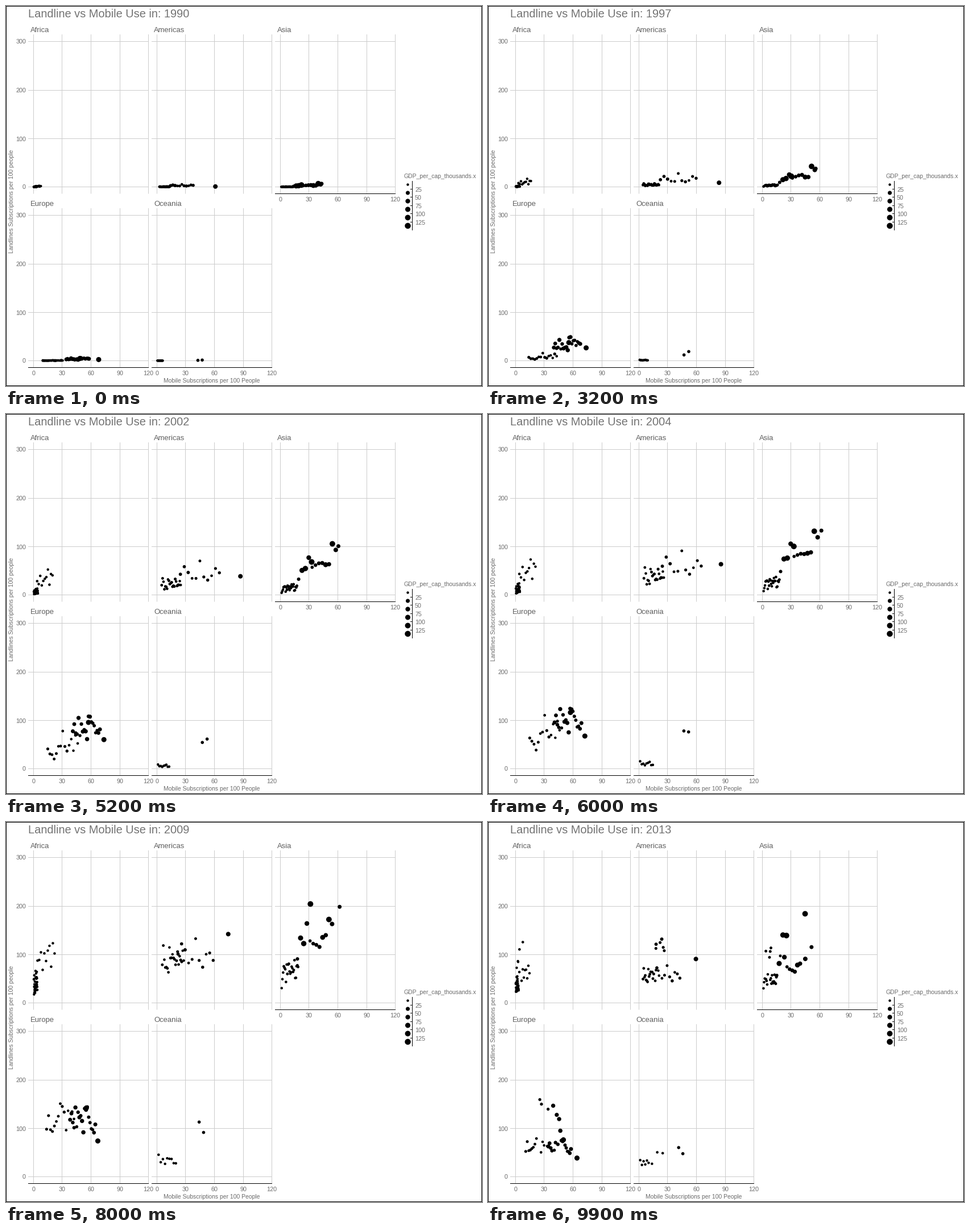
A matplotlib script that plays this animation: 837x669 px, repeating every 10000 ms.

```python
import numpy as np
import matplotlib.pyplot as plt
from matplotlib.animation import FuncAnimation
from matplotlib.patches import Rectangle

W, H, DPI = 837, 669, 64
PT = 72 / DPI  # points per pixel
TEXT, GRID = "#6b6b6b", "#cccccc"
T = np.arange(24)  # years since 1990
# steps that show the halfway pose between two years
TURNS = np.r_[3:24:5, 27:100:4]

# name: (left edge, y of zero, has bottom axis)
PANELS = {
    "Africa": (39, 318, False),
    "Americas": (256, 318, False),
    "Asia": (473, 318, True),
    "Europe": (39, 624, True),
    "Oceania": (256, 624, True),
}

rng = np.random.default_rng(11)
paths, diameters = [], []


def to_px(panel, x, y):
    left, zero, _ = PANELS[panel]
    return left + 9.5 + 50.5 / 30 * x, zero + 0.5 - 0.852 * y


def shuffled(n):
    """Even spread over -1..1 in random order."""
    return (2 * rng.permutation(n) + 1) / n - 1


def crowd(panel, n, size, x, spread, cap, mid, tau):
    """Countries with a landline arc (x in 1990, 2000, 2011) and
    logistic mobile growth towards cap, half done mid years after 1990."""
    arc = np.polyval(np.polyfit([0, 10, 21], x, 2), T)
    for u, v, w, s in zip(*(shuffled(n) for _ in range(4))):
        start = mid * (1 + 0.12 * v - 0.06 * u)
        xs = np.maximum(arc * (1 + spread * u), 0)
        ys = cap * (1 + 0.25 * w) / (1 + np.exp((start - T) / tau))
        # on the way back some countries have no partner and stay put
        keep = 1 if s > 0.6 else 0.5
        back = [keep * p[-1] + (1 - keep) * p[0] for p in (xs, ys)]
        paths.append(to_px(panel, np.r_[xs, back[0]], np.r_[ys, back[1]]))
        diameters.append(np.interp(s, [-1, 1], size))


crowd("Africa", 32, (4.4, 4.4), (1.7, 2.4, 1.9), 0.9, 85, 19.5, 2.7)
crowd("Africa", 11, (4.4, 4.6), (4.5, 11, 13), 0.75, 138, 16, 3.4)
crowd("Americas", 22, (4.4, 5.2), (8, 14, 17), 0.7, 125, 16.3, 2.8)
crowd("Americas", 11, (4.6, 6), (26, 44, 37), 0.5, 130, 14.5, 3.8)
crowd("Americas", 1, (8, 8), (61, 87, 67), 0, 200, 16.3, 3)
crowd("Asia", 24, (4.4, 5), (7, 9, 10), 0.9, 115, 18, 3)
crowd("Asia", 12, (5.5, 10), (28, 38, 34), 0.55, 160, 13.3, 3.4)
crowd("Asia", 1, (10, 10), (22, 32, 30), 0, 340, 17.4, 3.9)
crowd("Asia", 1, (7, 7), (43, 59, 61), 0, 240, 13.2, 3.7)
crowd("Europe", 20, (5.4, 7.6), (46, 55, 49), 0.27, 122, 9.7, 2.8)
crowd("Europe", 15, (4.4, 5.4), (20, 30, 26), 0.55, 132, 13.6, 2.3)
crowd("Europe", 1, (9, 9), (48.5, 57, 53.5), 0, 150, 10.3, 3)
crowd("Europe", 1, (9, 9), (68, 74, 64), 0, 75, 8.5, 2.5)
crowd("Oceania", 2, (5.6, 5.6), (45, 50, 44.5), 0.1, 108, 11.5, 2.5)
crowd("Oceania", 9, (4.4, 4.6), (3.2, 6, 12), 0.95, 75, 19.5, 3)

paths, diameters = np.array(paths), np.array(diameters)

plt.rcParams["font.family"] = "Liberation Sans"
fig = plt.figure(figsize=(W / DPI, H / DPI), dpi=DPI, facecolor="white")
ax = fig.add_axes([0, 0, 1, 1])
ax.set(xlim=(0, W), ylim=(H, 0))
ax.axis("off")


def line(x0, y0, x1, y1, color):
    ax.plot([x0, x1], [y0, y1], color=color, lw=PT, snap=False,
            solid_capstyle="butt", zorder=1)


def label(x, y, s, size, ha="left", color=TEXT, **kw):
    return ax.text(x, y, s, fontsize=size * PT, ha=ha, color=color,
                   **{"va": "baseline", **kw})


def dots(x, y, d):
    return ax.scatter(x, y, s=(np.asarray(d) * PT) ** 2, c="black",
                      linewidths=0, snap=False, zorder=3)


for name, (left, zero, has_axis) in PANELS.items():
    top, bottom = zero - 268, zero + 12.5
    for v in range(0, 301, 100):
        y = round(zero - 0.852 * v) + 0.5
        line(left, y, left + 212, y, GRID)
        if left == 39:
            label(35, y + 4, str(v), 10.7, "right")
    for v in range(0, 121, 30):
        x = left + 9.5 + round(50.5 / 30 * v)
        line(x, top, x, bottom, GRID)
        if has_axis:
            label(x, bottom + 14, str(v), 10.7, "center")
    if has_axis:
        line(left, bottom, left + 212, bottom, "black")
    label(left + 4, top - 4, name, 13, color="#5f5f5f")

label(361.5, 663, "Mobile Subscriptions per 100 People", 10.4, "center")
label(10.5, 344, "Landlines Subscriptions per 100 people", 10.4, "center",
      va="center", rotation=90)

label(700, 303, "GDP_per_cap_thousands.x", 10.4)
line(714.5, 308, 714.5, 395, "black")
for i, v in enumerate(range(25, 126, 25)):
    y = 322.5 + round(14.4 * i)
    line(711, y, 715, y, "black")
    label(719, y + 4.5, str(v), 10.7)
bins = np.arange(6)
dots(np.full(6, 706.5), 314.5 + 14.5 * bins, 4.4 + 2.7 * np.sqrt(bins))

ax.add_patch(Rectangle((0.5, 0.5), W - 1, H - 1, fill=False, ec="black",
                       lw=PT, snap=False))

cloud = dots(paths[:, 0, 0], paths[:, 1, 0], diameters)
title = label(39.5, 20, "", 20, color="#737373")


def draw(i):
    k = np.searchsorted(TURNS, i)
    pos = paths[:, :, k]
    if i == TURNS[-1]:
        pos = paths[:, :, -1]
    elif i in TURNS:
        pos = (pos + paths[:, :, k + 1]) / 2
    cloud.set_offsets(pos)
    title.set_text(f"Landline vs Mobile Use in: {1990 + k}")
    return cloud, title


anim = FuncAnimation(fig, draw, frames=100, interval=100, repeat=True,
                     repeat_delay=0, blit=False)
plt.show()
```
